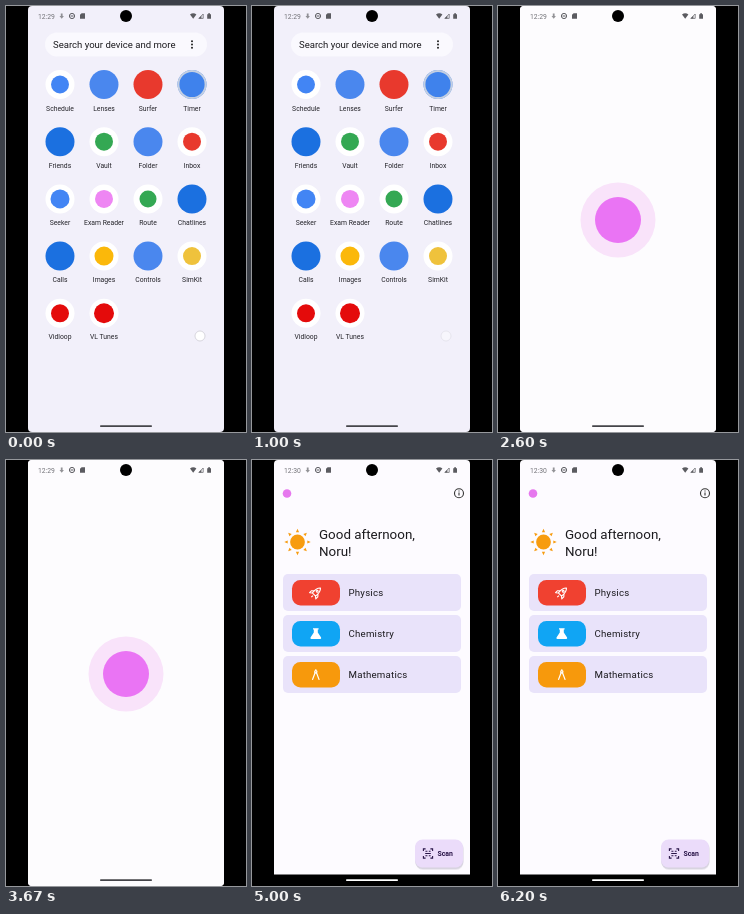
An HTML page for the animation above (6.27 s loop, 240 by 426 pixels).

```html
<!DOCTYPE html>
<html lang="en">
<head>
<meta charset="utf-8">
<title>Opening an app</title>
<style>
  html, body { margin: 0; width: 100%; height: 100%; overflow: hidden; background: #000; }
  svg { display: block; width: 100%; height: 100%; font-family: Roboto, Arial, sans-serif; }
  .loop { animation: 6.27s linear infinite; }
  .cut { animation-timing-function: step-end; }

  /* 1% = 62.7 ms */
  #swipe { animation-name: swipe; }
  #tap { animation-name: tap; }
  #window { animation-name: window; }
  #mark { animation-name: mark; }
  #app { animation-name: app; }
  .late { animation-name: late; }
  #bar { animation-name: bar; }
  #before { animation-name: before; }
  #pill { animation-name: pill; }

  @keyframes swipe { 0% { opacity: 1 } 2.1% { opacity: .45 } 21.2% { opacity: 0 } }
  @keyframes tap { 0% { opacity: 0 } 25.5% { opacity: .5 } 29.8% { opacity: 0 } }
  @keyframes window {
    0% { x: 84px; y: 179px; width: 28px; height: 28px; rx: 14px; opacity: 0; }
    29.8% { x: 84px; y: 179px; width: 28px; height: 28px; rx: 14px; opacity: 0;
      animation-timing-function: cubic-bezier(.2, .1, .1, 1); }
    36.2%, 100% { x: 22px; y: 0; width: 196px; height: 426px; rx: 4px; opacity: 1; }
  }
  @keyframes mark {
    0% { transform: translate(98px, 193px) scale(.38); opacity: 0; }
    29.8% { transform: translate(98px, 193px) scale(.38); opacity: 0;
      animation-timing-function: cubic-bezier(.2, .1, .1, 1); }
    36.2%, 100% { transform: translate(120px, 214px) scale(1); opacity: 1; }
  }
  @keyframes app { 0% { opacity: 0 } 67% { opacity: 1 } }
  @keyframes late { 0% { opacity: 0 } 75.4% { opacity: 1 } }
  @keyframes bar { 0% { opacity: 1 } 67% { opacity: 0 } 75.4% { opacity: 1 } }
  @keyframes before { 0% { opacity: 1 } 67% { opacity: 0 } }
  @keyframes pill { 0% { fill: #45454a } 67% { fill: #333338 } 75.4% { fill: #fff } }
</style>
</head>
<body>
<svg viewBox="0 0 240 426">
  <rect width="240" height="426"/>

  <g id="home">
    <rect x="22" width="196" height="426" rx="4" fill="#f2f0fa"/>
    <rect x="39" y="26.5" width="162" height="24" rx="12" fill="#faf9fe"/>
    <text x="47" y="42" font-size="9.55" fill="#1c1b1f">Search your device and more</text>
    <g fill="#222">
      <circle cx="186" cy="35.2" r="1"/><circle cx="186" cy="38.5" r="1"/><circle cx="186" cy="41.8" r="1"/>
    </g>
    <g id="grid" font-size="6.8" text-anchor="middle"></g>
    <circle cx="186" cy="78.5" r="13.6" fill="none" stroke="#c3cfe2" stroke-width="2"/>
    <g fill="#fff" stroke="#c9c8d0" stroke-width=".7">
      <circle id="swipe" class="loop cut" cx="194" cy="330" r="5"/>
      <circle id="tap" class="loop cut" cx="98" cy="191" r="5"/>
    </g>
  </g>

  <rect id="window" class="loop" x="22" width="196" height="426" fill="#fdfcfe"/>
  <g id="mark" class="loop">
    <circle r="37.5" fill="#f9e3fa"/>
    <circle r="23" fill="#ea74f4"/>
  </g>

  <g id="app" class="loop cut">
    <rect y="0" width="240" height="426"/>
    <path d="M22 414.5V4a4 4 0 0 1 4-4H214a4 4 0 0 1 4 4V414.5Z" fill="#fdfbff"/>
    <g fill="none" stroke="#333" stroke-width="1.1">
      <circle cx="207" cy="33.2" r="4.5"/>
      <path d="M207 32.6v3M207 30.6v1"/>
    </g>

    <g class="loop cut late">
      <circle cx="35" cy="33.5" r="4.3" fill="#e678ee"/>
      <g id="sun" fill="#f79c10"><circle cx="45.5" cy="82" r="7.4"/></g>
      <g font-size="13.4" fill="#1c1b1f">
        <text x="67" y="79">Good afternoon,</text>
        <text x="67" y="96">Noru!</text>
      </g>
      <g id="cards" font-size="9.7" letter-spacing=".2"></g>
    </g>

    <rect x="163.5" y="382" width="48" height="28" rx="7.5" fill="#8d80a0" opacity=".16"/>
    <rect x="163" y="381" width="48.5" height="28" rx="7.5" fill="#8d80a0" opacity=".2"/>
    <rect x="163" y="379.5" width="48" height="28" rx="7.5" fill="#ebdcfa"/>
    <g transform="translate(176 393.5)" fill="none" stroke="#291548" stroke-width="1.1">
      <path d="M-4.6-2.4V-4.6H-2.4M2.4-4.6H4.6V-2.4M4.6 2.4V4.6H2.4M-2.4 4.6H-4.6V2.4"/>
      <path d="M-2.6-2.2H-.6M.8-2.2H2.6M-2.8 0H2.8M-2.6 2.2H-.6M.8 2.2H2.6"/>
    </g>
    <text x="185.5" y="396" font-size="6.9" font-weight="600" fill="#291548">Scan</text>
  </g>

  <g id="bar" class="loop cut" fill="#5b5b60">
    <g font-size="6.8" fill="#737378">
      <text id="before" class="loop cut" x="32" y="12.6">12:29</text>
      <text class="loop cut late" x="32" y="12.6">12:30</text>
    </g>
    <path d="M54.8 7.5h1.8v2.5h1.3l-2.2 2.8-2.2-2.8h1.3Z" opacity=".65"/>
    <circle cx="66" cy="10" r="2.6" fill="none" stroke="#5b5b60" stroke-width="1"/>
    <path d="M64.5 10h3" stroke="#5b5b60"/>
    <path d="M75.6 7.2H79V12.8H74V8.8Z"/>
    <path d="M184 8.6Q187.2 6.1 190.4 8.6L187.2 12.8Z"/>
    <path d="M192.8 12.4 197.2 8V12.4Z" fill="none" stroke="#5b5b60" stroke-width=".7"/>
    <path d="M192.8 12.4 195.4 9.8V12.4Z"/>
    <path d="M201.2 8.2h1v-.9h1.8v.9h1v4.6h-3.8Z"/>
  </g>
  <circle cx="120" cy="10" r="6"/>
  <rect id="pill" class="loop cut" x="94" y="419.3" width="52" height="1.7" rx=".8"/>
</svg>

<script>
  const put = (id, html) => document.getElementById(id).insertAdjacentHTML('beforeend', html);
  const blue = '#1b70e0', sky = '#4a87ee', red = '#e8392d', green = '#34a853';

  // label, colour, radius of the dot on a white plate (none: full disc)
  const icons = [
    ['Schedule', '#4285f4', 9], ['Lenses', sky], ['Surfer', red], ['Timer', '#3f82ec'],
    ['Friends', blue], ['Vault', green, 9], ['Folder', sky], ['Inbox', red, 9],
    ['Seeker', '#4285f4', 9.5], ['Exam Reader', '#ee86f3', 9], ['Route', green, 8.5], ['Chatlines', blue],
    ['Calls', blue], ['Images', '#fbb80a', 9.5], ['Controls', sky], ['SimKit', '#efc23c', 9],
    ['Vidloop', '#e40b0b', 9], ['VL Tunes', '#e40b0b', 10]
  ];
  put('grid', icons.map(([label, color, dot], i) => {
    const x = 54 + 44 * (i % 4), y = 78.5 + 57.2 * Math.floor(i / 4);
    return `<circle cx="${x}" cy="${y}" r="14.5" fill="${dot ? '#fff' : color}"/>` +
      (dot ? `<circle cx="${x}" cy="${y}" r="${dot}" fill="${color}"/>` : '') +
      `<text x="${x}" y="${y + 26}" fill="#25242a">${label}</text>`;
  }).join(''));

  for (let a = 0; a < 360; a += 45)
    put('sun', `<path d="M43.9 72.2 45.5 68.8 47.1 72.2Z" transform="rotate(${a} 45.5 82)"/>`);

  const rocket = `<g transform="rotate(45)" fill="none" stroke="#fff" stroke-width="1.1" stroke-linejoin="round">
    <path d="M0-6.6Q3-4 2.3 2.6H-2.3Q-3-4 0-6.6ZM-2.5-.6-4.4 1.6V4.4L-2.2 2.6M2.5-.6 4.4 1.6V4.4L2.2 2.6M0 4V6.4"/>
    <circle cy="-2" r=".9"/></g>`;
  const flask = '<path fill="#fff" d="M-2.8-5.4H2.8V-4.2H2V-1.2L5.3 3.8Q5.8 5.4 4.2 5.4H-4.2Q-5.8 5.4-5.3 3.8L-2-1.2V-4.2H-2.8Z"/>';
  const compass = `<g fill="none" stroke="#fff" stroke-width="1.2">
    <path d="M-.6-2.2-3.4 5.2M.6-2.2 3.4 5.2M0-5.4V-4"/><circle cy="-3" r="1.1"/></g>`;

  const cards = [['Physics', '#f04130', rocket], ['Chemistry', '#10a5f4', flask], ['Mathematics', '#f7990c', compass]];
  put('cards', cards.map(([label, color, glyph], i) => `<g transform="translate(31 ${114 + 41 * i})">
    <rect width="178" height="37" rx="5" fill="#e9e3fa"/>
    <rect x="9" y="6" width="48" height="25.5" rx="8.5" fill="${color}"/>
    <g transform="translate(32.8 18.7)">${glyph}</g>
    <text x="65.5" y="22" fill="#1c1b1f">${label}</text></g>`).join(''));
</script>
</body>
</html>
```
